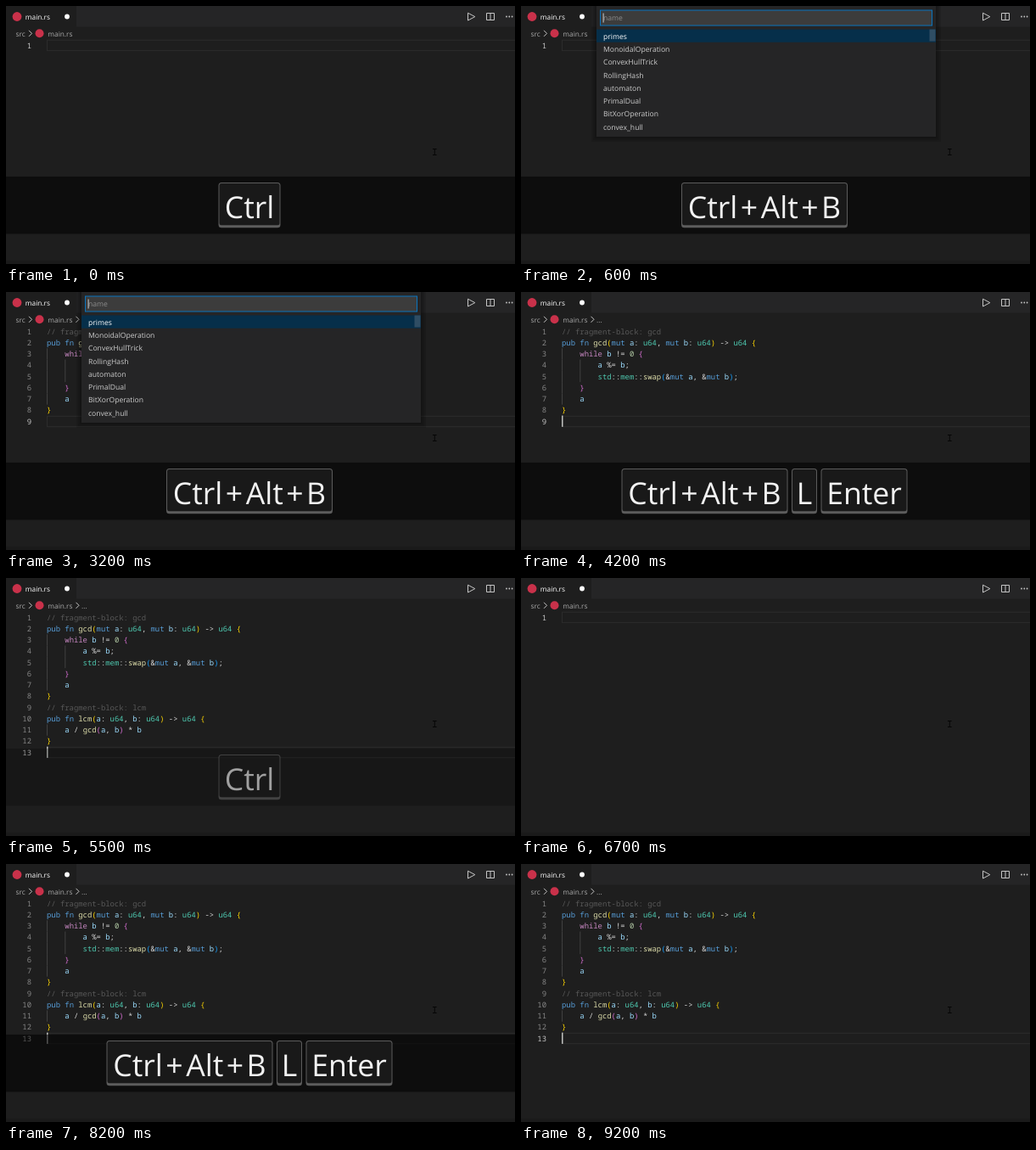
An HTML page that plays this animation: 600x304 px, repeating every 9.3 s.

```html
<!DOCTYPE html>
<html lang="en">
<head>
<meta charset="utf-8">
<title>Snippet insertion</title>
<style>
  html, body { margin: 0; width: 100%; height: 100%; overflow: hidden; background: #1e1e1e; }
  svg { display: block; width: 600px; height: 304px; }
  text { white-space: pre; text-rendering: geometricPrecision; }
  .ui { font: 8.3px "Open Sans", "Noto Sans", sans-serif; }
  .list { font: 8.6px "Open Sans", "Noto Sans", sans-serif; fill: #ccc; }
  .code { font: 8.88px "Noto Sans Mono", "DejaVu Sans Mono", monospace; fill: #d4d4d4; }
  .num { text-anchor: end; fill: #858585; }
  .num.on { fill: #c6c6c6; }
  .key { font: 35.6px "Open Sans", "Noto Sans", sans-serif; fill: #f2f2f2; text-anchor: middle; }
  .line { fill: none; stroke: #c5c5c5; }
</style>
</head>
<body>
<svg viewBox="0 0 600 304">
  <rect width="600" height="304" fill="#1e1e1e"/>
  <rect y="300" width="600" height="4" fill="#1a1a1a"/>

  <rect x="83" width="517" height="24.5" fill="#252526"/>
  <circle cx="13" cy="12.5" r="5.4" fill="#c9314a"/>
  <text class="ui" x="22.8" y="15.8" fill="#fff">main.rs</text>
  <circle cx="72" cy="12.5" r="2.9" fill="#fff"/>
  <path class="line" d="M544.5 8.2V17L552.8 12.6Z"/>
  <path class="line" d="M566.5 8.5H575.5V16.5H566.5ZM571 8.5V16.5"/>
  <g fill="#c5c5c5">
    <circle cx="590" cy="12.5" r=".9"/><circle cx="593.3" cy="12.5" r=".9"/><circle cx="596.6" cy="12.5" r=".9"/>
  </g>

  <g class="ui" fill="#a9a9a9">
    <text x="11.5" y="35.6">src</text>
    <path class="line" d="M27 28.8L30.5 32.3L27 35.8"/>
    <circle cx="39.5" cy="32.2" r="5" fill="#c9314a"/>
    <text x="49.3" y="35.6">main.rs</text>
    <g id="crumb">
      <path class="line" d="M82.5 28.8L86 32.3L82.5 35.8"/>
      <text x="89" y="35.6">...</text>
    </g>
  </g>

  <rect id="current" x="48.5" width="556" height="12.4" fill="none" stroke="#2c2c2c"/>
  <g id="code" class="code"></g>
  <rect id="caret" x="48" width="1.5" height="13.3" fill="#c0c1bf"/>
  <path d="M503 168.5H507.6M505.3 168.5V175.5M503 175.5H507.6" fill="none" stroke="#050505"/>

  <g id="popup" class="list"></g>

  <rect id="band" y="201" width="600" height="67.5" fill="#000" fill-opacity=".57"/>
  <g id="keys"></g>
</svg>

<script>
const LOOP = 9300, BLINK = 500, FADE = 400;
const $ = id => document.getElementById(id);

// Each track lists [start time, value]
const keyTrack = [
  [0, 'Ctrl'], [200, 'Ctrl+Alt'], [300, 'Ctrl+Alt+B'], [900, 'Ctrl+Alt+B G'], [1500, 'Ctrl+Alt+B G Enter'], [2300, ''],
  [2800, 'Ctrl'], [3000, 'Ctrl+Alt'], [3100, 'Ctrl+Alt+B'], [3700, 'Ctrl+Alt+B L'], [4100, 'Ctrl+Alt+B L Enter'], [4900, ''],
  [5250, 'Ctrl'], [5700, 'Ctrl+A'], [5800, 'Ctrl+A Del'], [6700, ''],
  [6800, 'Ctrl'], [7000, 'Ctrl+Alt'], [7100, 'Ctrl+Alt+B'], [7600, 'Ctrl+Alt+B L'], [7800, 'Ctrl+Alt+B L Enter'], [8600, '']
];
const popupTrack = [
  [0, null], [400, ''], [900, 'g'], [1500, null],
  [3200, ''], [3700, 'l'], [4100, null],
  [7200, ''], [7600, 'l'], [7800, null]
];
const lineTrack = [[0, 1], [1900, 9], [4500, 13], [5800, 1], [8200, 13]];
const crumbTrack = [[0, false], [2300, true], [6200, false], [8200, true]];
const selectTrack = [[0, false], [5700, true], [5800, false]];
const blinkTrack = [-500, 1500, 1900, 4100, 4500, 5800, 7800, 8200].map(t => [t, t]);
const fadeTrack = [-500, 2800, 5250, 6800].map(t => [t, t]);

const at = (track, t) => track.reduce((v, [start, value]) => start <= t ? value : v, track[0][1]);
const show = (el, on) => { el.style.display = on ? '' : 'none'; };
const esc = s => s.replace(/&/g, '&amp;').replace(/</g, '&lt;');
const rowY = i => 46.4 + 13.26 * i;

const source = `// fragment-block: gcd
pub fn gcd(mut a: u64, mut b: u64) -> u64 {
    while b != 0 {
        a %= b;
        std::mem::swap(&mut a, &mut b);
    }
    a
}
// fragment-block: lcm
pub fn lcm(a: u64, b: u64) -> u64 {
    a / gcd(a, b) * b
}
`.split('\n');

const brackets = ['#ffd700', '#da70d6', '#179fff'];
let depth = 0;

function colour(tok) {
  if (tok.startsWith('//')) return '#585858';
  if (/^[({]$/.test(tok)) return brackets[depth++ % 3];
  if (/^[)}]$/.test(tok)) return brackets[--depth % 3];
  if (/^(pub|fn|mut)$/.test(tok)) return '#569cd6';
  if (tok === 'while') return '#c586c0';
  if (/^(gcd|lcm|swap)$/.test(tok)) return '#dcdcaa';
  if (/^(u64|std|mem)$/.test(tok)) return '#4ec9b0';
  if (/^\d+$/.test(tok)) return '#b5cea8';
  if (/^\w+$/.test(tok)) return '#9cdcfe';
  return '#d4d4d4';
}

function paint(line) {
  const toks = line.match(/\/\/.*|\w+|\s+|[(){}]|[^\w\s(){}]+/g) || [];
  return toks.map(s => `<tspan fill="${colour(s)}">${esc(s)}</tspan>`).join('');
}

$('code').innerHTML = source.map((line, i) => {
  const y = rowY(i), indent = line.search(/\S|$/) / 4;
  let guides = '';
  for (let k = 0; k < indent; k++)
    guides += `<rect x="${48 + 21.3 * k}" y="${y - 6.6}" width="1" height="13.3" fill="#404040"/>`;
  return `<g><text class="num" x="30" y="${y + 3.2}">${i + 1}</text><g>
    <rect class="sel" x="48" y="${y - 6.6}" width="${line.length * 5.33 + 3}" height="13.3" fill="#264f78"/>
    ${guides}<text x="48" y="${y + 3.2}">${paint(line)}</text></g></g>`;
}).join('');
const rows = [...$('code').children];
const marks = document.querySelectorAll('.sel');

const names = ['primes', 'MonoidalOperation', 'ConvexHullTrick', 'RollingHash', 'automaton',
  'PrimalDual', 'BitXorOperation', 'convex_hull', 'gcd', 'lcm'];

function matches(query) {
  const rank = s => s.startsWith(query) ? 0 : 1;
  return names.filter(s => s.toLowerCase().includes(query))
    .sort((a, b) => rank(a) - rank(b)).slice(0, 8);
}

function label(name, query) {
  const i = name.toLowerCase().indexOf(query);
  return query ? `${name.slice(0, i)}<tspan fill="#18a3ff">${name[i]}</tspan>${name.slice(i + 1)}` : name;
}

function drawPopup(query) {
  const found = matches(query), h = 28 + 15.3 * found.length + 3.6;
  const shadow = [6, 4, 2].map(d =>
    `<rect x="${89 - d}" width="${400 + 2 * d}" height="${h + d}" fill="#000" opacity=".13"/>`).join('');
  const items = found.map((name, i) =>
    `<text x="97" y="${38.6 + 15.3 * i}"${i ? '' : ' fill="#fff"'}>${label(name, query)}</text>`).join('');
  const thumb = query ? '' : '<rect x="481.5" y="27.5" width="7" height="14" fill="#2f4d63"/>';
  $('popup').innerHTML = `${shadow}<rect x="89" width="400" height="${h}" fill="#252526"/>
    <rect x="93.5" y="5" width="391" height="18" fill="#3c3c3c" stroke="#0a74bd"/>
    <text x="97" y="17.2" fill="${query ? '#ccc' : '#8c8c8c'}">${query || 'name'}</text>
    <rect id="cursor" x="${query ? 102 : 96.6}" y="8.5" width="1" height="11" fill="#ccc"/>
    <rect x="89" y="27.5" width="400" height="15.2" fill="#062f4a"/>${thumb}${items}`;
}

const keyWidth = { 'Ctrl': 73, 'Ctrl+Alt': 148, 'Ctrl+Alt+B': 196, 'Ctrl+A': 122, G: 39, L: 30, Enter: 102, Del: 66 };
const GAP = 4.5;

function drawKeys(combo) {
  const list = combo ? combo.split(' ') : [];
  const total = list.reduce((sum, k) => sum + keyWidth[k] + GAP, -GAP);
  let x = 287 - total / 2;
  $('keys').innerHTML = list.map(k => {
    const w = keyWidth[k], left = x;
    x += w + GAP;
    const [head, ...rest] = k.split('+');
    const tail = rest.map(s => `<tspan dx="3.5">+</tspan><tspan dx="3.5">${s}</tspan>`).join('');
    return `<rect x="${left}" y="208" width="${w}" height="53.3" rx="3.5" fill="#5c5c5c"/>
      <rect x="${left + 1}" y="209" width="${w - 2}" height="49.3" rx="2.5" fill="#191919"/>
      <text class="key" x="${left + w / 2}" y="250.3">${head}${tail}</text>`;
  }).join('');
}

let lastCombo, lastQuery;

function render(t) {
  const lines = at(lineTrack, t), query = at(popupTrack, t), combo = at(keyTrack, t);
  const selected = at(selectTrack, t), active = rowY(lines - 1);

  rows.forEach((row, i) => {
    show(row, i < lines);
    show(row.lastElementChild, i < lines - 1);
    row.firstElementChild.classList.toggle('on', i === lines - 1);
  });
  marks.forEach(m => show(m, selected));
  show($('crumb'), at(crumbTrack, t));

  $('current').setAttribute('y', active - 6.2);
  $('caret').setAttribute('y', active - 6.9);
  const lit = start => Math.floor((t - start) / BLINK) % 2 === 0;
  show($('caret'), query === null && lit(at(blinkTrack, t)));

  if (query !== lastQuery) {
    if (query !== null) drawPopup(query);
    lastQuery = query;
  }
  show($('popup'), query !== null);
  if (query !== null) {
    const opened = popupTrack.filter(p => p[0] <= t).pop()[0];
    show($('cursor'), lit(opened));
  }

  if (combo !== lastCombo) drawKeys(lastCombo = combo);
  const alpha = combo ? Math.min(1, (t - at(fadeTrack, t)) / FADE) : 0;
  $('keys').style.opacity = alpha;
  $('band').style.opacity = alpha * alpha;
}

const begin = performance.now();
function tick() {
  render((performance.now() - begin) % LOOP);
  requestAnimationFrame(tick);
}
tick();
</script>
</body>
</html>
```
